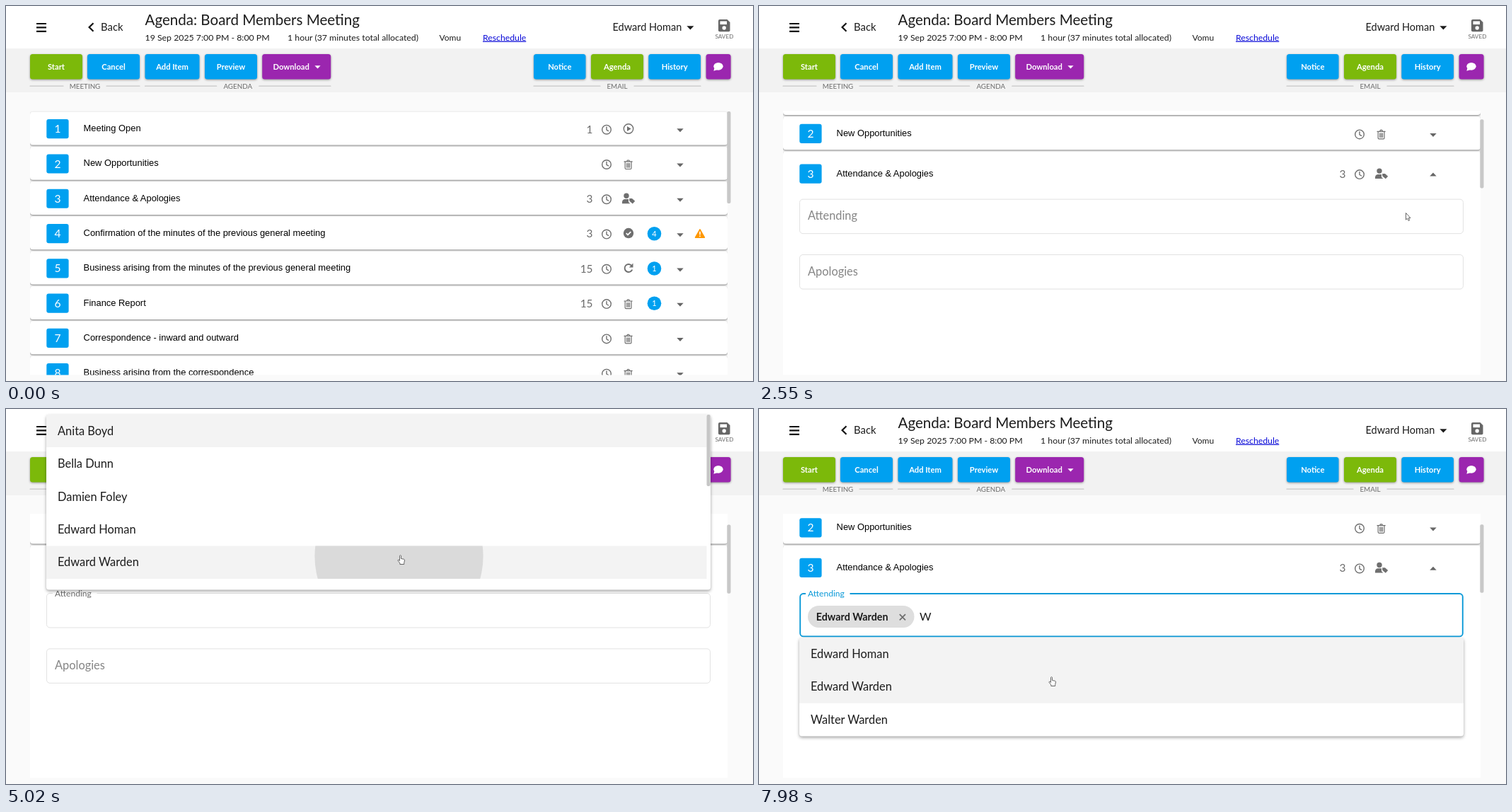
Animation, 1056 px wide and 530 px high, one loop 8000 ms. Source, as an HTML page:

```html
<!DOCTYPE html>
<html lang="en">
<head>
<meta charset="utf-8">
<title>Meeting agenda</title>
<style>
html, body { margin: 0; width: 100%; height: 100%; overflow: hidden; background: #fafafa; }
svg { display: block; width: 100vw; height: 100vh; }
text { font-family: Lato, "Open Sans", sans-serif; fill: #1c1c1c; white-space: pre; }
.row { font-family: "Liberation Sans", Arial, sans-serif; fill: #000; }
.mid { text-anchor: middle; }
.end { text-anchor: end; }
.white { fill: #fff; }
.grey { fill: #6c6c6c; }
.bold { font-weight: 700; }
.line { fill: none; stroke: #6f6f6f; stroke-width: 1.4; stroke-linejoin: round; stroke-linecap: round; }
.card { fill: #fff; filter: drop-shadow(0 1.7px .8px rgba(0,0,0,.5)); }
.btn { filter: drop-shadow(0 1.2px 1.6px rgba(0,0,0,.38)); }
.menu { filter: drop-shadow(0 2px 2px rgba(0,0,0,.36)); }
</style>
</head>
<body>
<svg id="stage" viewBox="0 0 1056 530" xmlns="http://www.w3.org/2000/svg"></svg>
<script>
const LOOP = 8000, STEP = 79.6;
const BLUE = '#00a0f0', GREEN = '#7cb90a', PURPLE = '#9b26af', INK = '#6f6f6f', TINT = '#f3f3f3', FOCUS = '#0c9ad8';
const PITCH = 49.28, FIRST = 173.7, FIELD = 299.3, GROW = 357, SCROLL = 55.2;
const HOST = 'Edward Homan', GUEST = 'Edward Warden';
const PEOPLE = ['Anita Boyd', 'Bella Dunn', 'Damien Foley', HOST, GUEST];
const FOUND = [HOST, GUEST, 'Walter Warden'];

// markup helpers
const rect = (x, y, w, h, fill, more = '') => `<rect x="${x}" y="${y}" width="${w}" height="${h}" fill="${fill}" ${more}/>`;
const text = (x, y, size, str, cls = '', more = '') =>
  `<text x="${x}" y="${y}" font-size="${size}" class="${cls}" ${more}>${str.replace('&', '&amp;')}</text>`;
const path = (d, fill, more = '') => `<path d="${d}" fill="${fill}" ${more}/>`;
const line = (d, more = '') => `<path d="${d}" class="line" ${more}/>`;
const disc = (x, y, r, fill, more = '') => `<circle cx="${x}" cy="${y}" r="${r}" fill="${fill}" ${more}/>`;
const at = (x, y, body) => `<g transform="translate(${x} ${y})">${body}</g>`;
const group = (id, body) => `<g id="${id}">${body}</g>`;
const clip = (id, x, y, w, h) => `<clipPath id="${id}">${rect(x, y, w, h, '#000', `id="${id}Box"`)}</clipPath>`;

const icons = {
  clock: line('M0-3.7V.4L2.6 1.9') + '<circle r="6.3" class="line"/>',
  play: path('M-2-3.4L3.6 0L-2 3.4Z', INK) + '<circle r="6.7" class="line"/>',
  trash: at(-.4, 1.4, line('M-5.6-4.3H5.6M-2-4.3L-1.2-6.2H1.2L2-4.3M-4.4-4.3V5.1Q-4.4 6.3-3.3 6.3H3.3Q4.4 6.3 4.4 5.1V-4.3M-1.9-1.8V4M0-1.8V4M1.9-1.8V4', 'style="stroke-width:1.2"')),
  person: disc(-3, -3.8, 3.7, INK) + path('M-9 7.2V5.5Q-9 1-4.5 1H0V5L2.4 7.2Z', INK) + path('M1.2 0H5L9.2 3.8L5.8 7.4L1.2 3.4Z', INK),
  check: disc(0, -.3, 7.2, INK) + path('M-3.2-.2L-1 2.1L3.3-2.3', 'none', 'stroke="#fff" stroke-width="1.7"'),
  redo: line('M4.4-3.6A5.5 5.5 0 1 0 4.9 2.6', 'style="stroke-width:1.9"') + path('M6.5-7V-1.2H.8Z', INK),
  warn: path('M0-5.6L6.4 5.6H-6.4Z', '#ff9800', 'stroke="#ff9800" stroke-width="1.6" stroke-linejoin="round"') + rect(-.8, -2.8, 1.6, 4.6, '#fff') + rect(-.8, 3, 1.6, 1.6, '#fff'),
  caret: path('M-4.7-2.4H4.7L0 2.6Z', '#666')
};

const ITEMS = [
  ['Meeting Open', '1', 'play'],
  ['New Opportunities', '', 'trash'],
  ['Attendance & Apologies', '3', 'person'],
  ['Confirmation of the minutes of the previous general meeting', '3', 'check', '4', 'warn'],
  ['Business arising from the minutes of the previous general meeting', '15', 'redo', '1'],
  ['Finance Report', '15', 'trash', '1'],
  ['Correspondence - inward and outward', '', 'trash'],
  ['Business arising from the correspondence', '', 'trash']
];

function rowCard(i) {
  return rect(34, (FIRST - 24.2 + PITCH * i).toFixed(2), 986, 47, '#fff', `rx="4" class="card" id="card${i}"`);
}
function rowHead([title, mins, icon, count, warn], i) {
  const body = rect(57.3, -13.6, 31.3, 27.2, BLUE, 'rx="3"') + text(73, 5.6, 15.6, String(i + 1), 'mid white') +
    text(109.6, 3.4, 12.9, title, 'row') + text(829.5, 5.8, 15.4, mins, 'end grey') +
    at(849, 1, icons.clock) + at(880, -.2, icons[icon]) +
    (count ? disc(916.5, .2, 9.8, BLUE) + text(916.5, 4, 11, count, 'mid white') : '') +
    (i === 2 ? disc(953.5, .5, 11.7, '#eee', 'id="hover"') : '') +
    at(953, 2, group(`caret${i}`, icons.caret)) + (warn ? at(981, 0, icons[warn]) : '');
  return at(0, (FIRST + PITCH * i).toFixed(2), body);
}
const row = (item, i) => rowCard(i) + rowHead(item, i);

function button(x, w, label, fill, dx = 0) {
  return rect(x, 68, w, 35.6, fill, 'rx="3.5" class="btn"') + text(x + w / 2 + dx, 90, 11.2, label, 'mid white bold');
}
function caption(x1, x2, label, gap) {
  const mid = (x1 + x2) / 2;
  return text(mid, 117.3, 9.8, label, 'mid grey') +
    line(`M${x1} 113.2H${mid - gap}M${mid + gap} 113.2H${x2}`, 'style="stroke:#c8c8c8;stroke-width:1.2"');
}

const header = rect(0, 0, 1056, 60, '#fff') + rect(0, 60, 1056, 62, '#f2f2f2') +
  path('M43 25H57M43 30.4H57M43 35.8H57', 'none', 'stroke="#111" stroke-width="2.2"') +
  path('M123.5 24.2L117.6 30L123.5 35.8', 'none', 'stroke="#111" stroke-width="2.2"') +
  text(134, 35, 14.9, 'Back') + text(196.5, 27, 20.55, 'Agenda: Board Members Meeting') +
  text(196.5, 48.6, 12.32, '19 Sep 2025 7:00 PM - 8:00 PM') +
  text(398, 48.6, 12.32, '1 hour (37 minutes total allocated)') + text(612.5, 48.6, 12, 'Vomu') +
  text(674, 48.6, 12.25, 'Reschedule', '', 'text-decoration="underline" style="fill:#0a0ad8"') +
  text(857.5, 35, 14.5, HOST) + path('M962.4 28.2H972.4L967.4 33.6Z', '#1c1c1c') +
  path('M1009 19H1019.5L1023.5 23V34.5Q1023.5 36.3 1021.7 36.3H1009Q1007 36.3 1007 34.5V21Q1007 19 1009 19Z', '#666') +
  rect(1009.5, 21.5, 9.5, 4.6, '#fff') + disc(1015.2, 31, 2.7, '#fff') + text(1015.4, 46, 8.2, 'SAVED', 'mid grey') +
  button(34, 74, 'Start', GREEN) + button(115, 74, 'Cancel', BLUE) + button(196.5, 77, 'Add Item', BLUE) +
  button(281, 74, 'Preview', BLUE) + button(362.2, 97, 'Download', PURPLE, -7.5) + path('M436.4 84.2H444.6L440.5 88.6Z', '#fff') +
  button(746, 73.5, 'Notice', BLUE) + button(827, 74, 'Agenda', GREEN) + button(908.3, 73.7, 'History', BLUE) +
  button(989.6, 35, '', PURPLE) + '<ellipse cx="1007" cy="85.3" rx="6.7" ry="5.4" fill="#fff"/>' + path('M1001.6 87L1000.4 91.8L1006 90Z', '#fff') +
  caption(34, 189, 'MEETING', 30.5) + caption(196.5, 459, 'AGENDA', 30) + caption(746, 982, 'EMAIL', 24);

const box = (id) => rect(57.5, .4, 938, 48.5, '#fff', `rx="4.5" stroke="#e2e2e2" id="${id}"`);
const fields = at(0, FIELD,
  box('attend') + rect(66, -2, 62.5, 5, '#fff', 'id="notch"') + text(69, 29.7, 16.3, 'Attending', '', 'id="label"') +
  rect(66, 33, 80, 4.5, '#fff', 'id="trim"') +
  group('chip', rect(69, 17.9, 150.5, 31, '#dedede', 'rx="15.5"') + text(80.8, 38.5, 14.3, GUEST, 'bold') +
    path('M198.8 30L207 38.2M207 30L198.8 38.2', 'none', 'stroke="#6c6c6c" stroke-width="1.7"')) +
  text(227, 38.7, 16, 'W', '', 'id="typed"') + rect(0, 0, 1, 19, '#8a8a8a', 'id="cursorBar"') +
  group('second', box('apology') + text(69, 29.7, 16.4, 'Apologies', '', 'style="fill:#858585"') + rect(66, 33, 80, 4.5, '#fff')));

const option = (name, top) => text(73, top + 28.6, 16.4, name);
const topMenu = rect(57, 8, 939, 247.5, '#fff', 'rx="4" class="menu"') + rect(57, 8, 933.5, 46, TINT) +
  rect(57, 193.5, 933.5, 46.5, TINT, 'id="hot"') +
  `<g clip-path="url(#hotClip)">${disc(555.5, 208, 1, '#dadada', 'id="ripple"')}</g>` +
  PEOPLE.map((p, i) => option(p, 8 + 46.45 * i)).join('') + rect(990.5, 8, 5.2, 101, '#c6c6c6', 'rx="2" id="menuThumb"');
const lowMenu = rect(57, 323, 939, 139.5, '#fff', 'rx="4" class="menu"') + rect(57, 323, 939, 92.7, TINT) +
  FOUND.map((p, i) => option(p, 323 + 46.45 * i)).join('');

const outline = 'stroke="#555" stroke-width=".9" stroke-linejoin="round"';
const pointer = group('arrow', path('M0 0V9.6L2.1 7.7L3.6 11L5.2 10.3L3.8 7.1H6.5Z', '#fff', outline)) +
  group('hand', path('M-1 .8Q0-.6 1 .8V5L5 5.8Q6.2 6.2 6 7.6L5.2 11V13H-.6V11.4L-3.4 7.8Q-3.6 6.4-2.2 6.8L-1 8Z', '#fff', outline));

document.getElementById('stage').innerHTML =
  `<defs>${clip('view', 34, 148, 986, 373.5)}${clip('open', 34, 240, 986, 47)}${clip('hotClip', 57, 193.5, 933.5, 46.5)}</defs>` +
  rect(0, 0, 1056, 530, '#fafafa') + header +
  `<g clip-path="url(#view)">${group('list',
    ITEMS.slice(0, 2).map(row).join('') + rowCard(2) + group('head', rowHead(ITEMS[2], 2)) +
    `<g clip-path="url(#open)">${group('content', fields)}</g>` +
    group('below', ITEMS.slice(3).map((item, i) => row(item, i + 3)).join('')))}</g>` +
  rect(1019.3, 149, 5.2, 130, '#c8c8c8', 'rx="2" id="thumb"') +
  group('topMenu', topMenu) + group('lowMenu', lowMenu) + group('pointer', pointer);

const el = {};
document.querySelectorAll('[id]').forEach(n => el[n.id] = n);
const set = (id, attrs) => { for (const k in attrs) el[id].setAttribute(k, attrs[k]); };
const show = (id, on) => el[id].setAttribute('visibility', on ? 'inherit' : 'hidden');
const move = (id, y) => set(id, { transform: `translate(0 ${y})` });
const within = (t, ...spans) => spans.some(([a, b]) => t >= a && t < b);
const mix = (a, b, p) => a + (b - a) * p;
const clamp = (v) => Math.min(1, Math.max(0, v));

// cubic-bezier(.4, 0, .2, 1) over dur ms
function ease(t, start, dur) {
  const x = clamp((t - start) / dur);
  if (x === 0 || x === 1) return x;
  let lo = 0, hi = 1;
  for (let i = 0; i < 24; i++) {
    const s = (lo + hi) / 2, r = 1 - s;
    if (1.2 * r * r * s + .6 * r * s * s + s * s * s < x) lo = s; else hi = s;
  }
  return lo * lo * (3 - 2 * lo);
}

// pointer stops: time, x, y
const TRACK = [
  [490, 860, 352], [1140, 956, 273], [2150, 956, 273], [2555, 914.5, 292.5], [2950, 850, 284], [3270, 850, 284],
  [3670, 745.5, 328], [3830, 745.5, 328], [4620, 560, 210], [4705, 564, 204], [4865, 557.5, 206.5],
  [5400, 557.5, 206.5], [5730, 464, 288], [7110, 464, 288], [7490, 137, 352], [7890, 413.5, 378.5], [8000, 413.5, 378.5]
];
function pointerAt(t) {
  const i = Math.max(1, TRACK.findIndex(k => k[0] > t));
  const [a, x0, y0] = TRACK[i - 1], [b, x1, y1] = TRACK[i];
  const u = clamp((t - a) / (b - a)), p = u * u * (3 - 2 * u);
  return [mix(x0, x1, p), mix(y0, y1, p)];
}

function drawList(t, chip) {
  const grow = ease(t, 1616.5, 225), scroll = SCROLL * ease(t, 2311, 500);
  move('list', -scroll);
  move('head', 7.4 * grow);
  move('content', 16 * grow);
  move('below', GROW * grow);
  set('card2', { height: 47 + GROW * grow });
  set('openBox', { height: 55 + GROW * grow });
  set('caret2', { transform: grow > 0 ? 'translate(0 -1) scale(1 -1)' : '' });
  show('hover', within(t, [1280, 2200]));
  const ratio = 372 / (1064 + GROW * grow + (chip ? 13 : 0));
  set('thumb', { y: 149 + scroll * ratio, height: 372 * ratio });
}

function drawField(t, chip, typed) {
  const focus = within(t, [3110, 4940], [5150, LOOP + STEP]);
  const float = ease(t, 3200, 150);
  set('attend', {
    x: focus ? 58.2 : 57.5, width: focus ? 936.6 : 938,
    y: focus ? .9 : .4, height: (focus ? 47 : 48.5) + (chip ? 13.4 : 0),
    stroke: focus ? FOCUS : '#e2e2e2', 'stroke-width': focus ? 1.9 : 1
  });
  show('notch', float > 0);
  show('trim', float === 0);
  set('label', { y: mix(29.7, 5.2, float), 'font-size': mix(16.3, 12.1, float) });
  el.label.style.fill = float === 0 ? '#858585' : focus ? FOCUS : '#6c6c6c';
  show('chip', chip);
  show('typed', typed);
  move('second', chip ? 91.6 : 78.4);
  set('cursorBar', { x: typed ? 244 : chip ? 227 : 69, y: chip ? 23.9 : 17.9, fill: typed ? '#4fa9cc' : '#8a8a8a' });
  show('cursorBar', within(t, [3240, 3880], [4380, 4860], [5170, 5620], [6125, 6935], [7420, 7880]));
}

function drawMenus(t, typed) {
  const opening = ease(t, 3240, 120);
  show('topMenu', within(t, [3240, 5240], [6360, 6530]));
  set('topMenu', {
    opacity: typed ? 1 : Math.min(opening, clamp((5240 - t) / 90)),
    transform: `translate(0 255) scale(1 ${.8 + .2 * opening}) translate(0 -255)`
  });
  set('menuThumb', { height: typed ? 110 : 101 });
  show('hot', within(t, [4860, 5240]));
  show('ripple', within(t, [5015, 5240]));
  set('ripple', { r: Math.max(0, 120 + (t - 5027) * 4.6) });
  show('lowMenu', t >= 6530);
}

function drawPointer(t) {
  const hand = within(t, [1280, 2200], [4700, 5410], [7960, LOOP + STEP]);
  const [x, y] = pointerAt(t);
  set('pointer', { transform: `translate(${x} ${y})` });
  show('pointer', within(t, [480, 6360], [7090, LOOP + STEP]));
  show('arrow', !hand);
  show('hand', hand);
}

function draw(time) {
  const t = Math.floor(time / STEP) * STEP + 12;
  const chip = t >= 5150, typed = t >= 6360;
  drawList(t, chip);
  drawField(t, chip, typed);
  drawMenus(t, typed);
  drawPointer(t);
}

let begin = null;
function tick(now) {
  if (begin === null) begin = now;
  draw((now - begin) % LOOP);
  requestAnimationFrame(tick);
}
draw(0);
requestAnimationFrame(tick);
</script>
</body>
</html>
```
